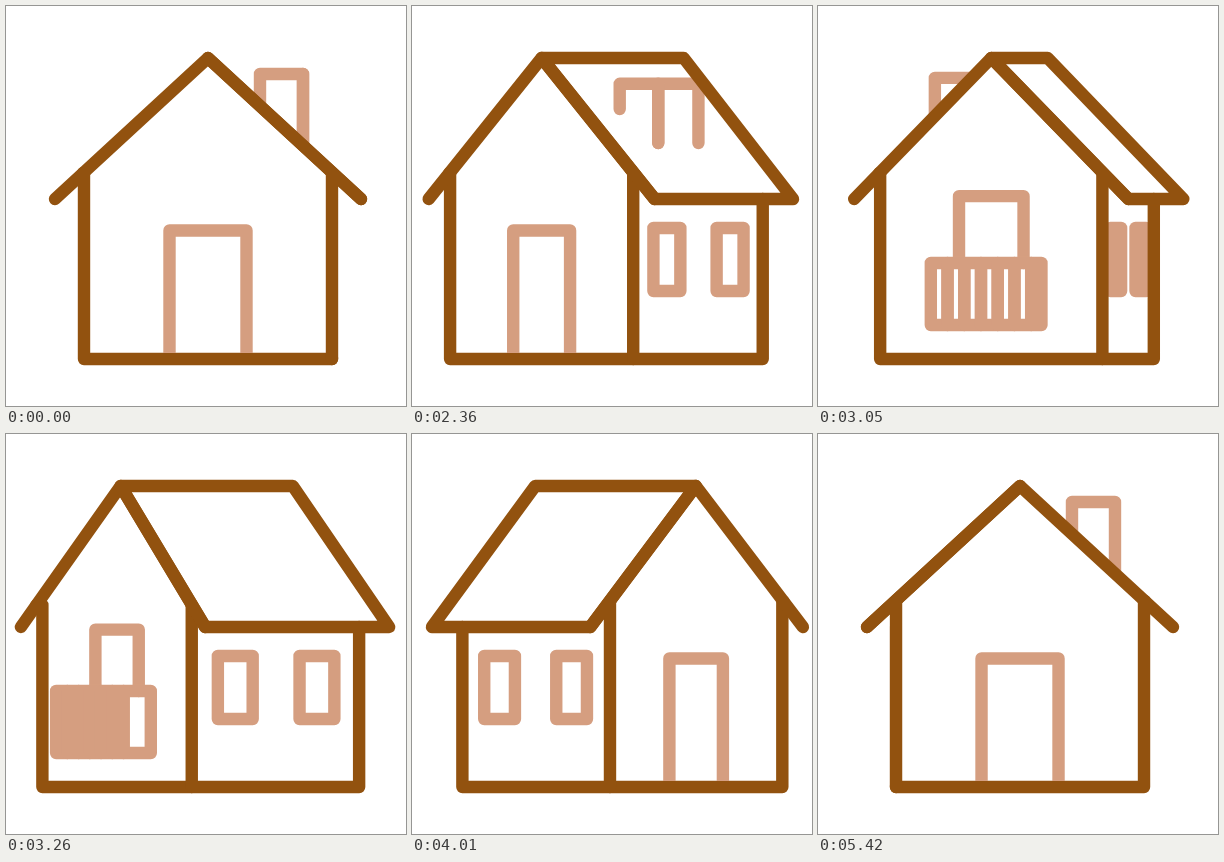
Recreate the animation shown at these times as an HTML page with a canvas. Size 400 by 400 pixels, loop 5.45 s.

```html
<!DOCTYPE html>
<html lang="en">
<head>
<meta charset="utf-8">
<title>Turning house</title>
<style>
html, body { margin: 0; width: 100%; height: 100%; overflow: hidden; background: #fff; }
canvas { display: block; width: 400px; height: 400px; }
</style>
</head>
<body>
<canvas id="stage" width="400" height="400"></canvas>
<script>
const ctx = document.getElementById('stage').getContext('2d');
const BROWN = '#92520f', TAN = '#d59e80';
const LOOP = 5450, HOLD = 2030, STEP = 30, START = 1990;
const CENTER = 202, PEAK = 52, EAVE = 193, BASE = 353;

function bezier(a, b, c, d, s) {
  const u = 1 - s;
  return a * u * u * u + 3 * b * u * u * s + 3 * c * u * s * s + d * s * s * s;
}

function ease(x) {
  let lo = 0, hi = 1;
  for (let i = 0; i < 30; i++) {
    const mid = (lo + hi) / 2;
    if (bezier(0, .19, .23, 1, mid) < x) lo = mid; else hi = mid;
  }
  return bezier(0, 0, 1, 1, lo);
}

function trace(points) {
  ctx.beginPath();
  points.forEach(([x, y]) => ctx.lineTo(x, y));
}

function line(color, points, closed) {
  trace(points);
  if (closed) ctx.closePath();
  ctx.strokeStyle = color;
  ctx.stroke();
}

function blank(points) {
  trace(points);
  ctx.fillStyle = '#fff';
  ctx.fill();
}

function box(x1, y1, x2, y2) {
  line(TAN, [[x1, y1], [x2, y1], [x2, y2], [x1, y2]], true);
}

// An upside-down U: two legs joined at the top.
function arch(x1, y1, top, x2, y2) {
  line(TAN, [[x1, y1], [x1, top], [x2, top], [x2, y2]]);
}

// turn: 0 = end face seen straight on, 1 = corner view, 2 = long side straight on.
// Views with the end face on the right are drawn mirrored.
function drawHouse(turn, isBack, chimneyNear, mirrored) {
  const mix = (a, b, f) => a + (b - a) * f;
  const pose = (corner, side, front = 0) =>
    turn < 1 ? mix(front, corner, turn) : mix(corner, side, turn - 1);
  const squash = pose(Math.SQRT1_2, 0, 1);

  // Both ends of a width on the end face, then the far end of its long side.
  function span(half, corner, side) {
    const mid = CENTER - pose(81, side / 2);
    const near = mid + half * squash;
    return [mid - half * squash, near, near + pose(corner, side)];
  }

  const [wallA, wallB, wallC] = span(124, 145, 296);
  const [roofA, roofB, roofC] = span(153, 155, 350);
  const [ridgeA, , ridgeB] = span(0, 159, 248);
  const wallTop = pose(167, EAVE, 167);
  const roofPlane = [[ridgeA, PEAK], [ridgeB, PEAK], [roofC, EAVE], [roofB, EAVE]];
  const gable = [[roofA, EAVE], [ridgeA, PEAK], [roofB, EAVE]];

  ctx.setTransform(1, 0, 0, 1, 0, 0);
  ctx.fillStyle = '#fff';
  ctx.fillRect(0, 0, 400, 400);
  if (mirrored) ctx.setTransform(-1, 0, 0, 1, 2 * CENTER, 0);
  ctx.lineWidth = 12.4;
  ctx.lineJoin = ctx.lineCap = 'round';

  // chimney, in front of or behind the roof plane
  const top = pose(79, 84.5, 68), low = 137, high = 103;
  const thick = pose(38, 0, 43), reach = 95 * squash;
  if (chimneyNear) {
    const offset = pose(6, 12) * (mirrored ? -1 : 1);
    const outer = CENTER + reach - pose(23, 27) - offset;
    blank(roofPlane);
    arch(outer, low, top, outer + pose(45, 54), low);
    arch(outer, low, top, outer - thick, high);
  } else {
    arch(CENTER - reach, low, top, CENTER - reach + thick, high);
    blank(roofPlane);
  }
  blank([...gable, [wallB, BASE], [wallA, BASE]]);

  // side windows
  const length = wallC - wallB;
  if (length > 4)
    for (const p of [.26, .748])
      box(wallB + length * (p - .104), 222, wallB + length * (p + .104), 285);

  // end wall, tied to the roof edge
  const overhang = mix(ridgeA, roofA, (wallTop - PEAK) / (EAVE - PEAK));
  line(BROWN, [[overhang, wallTop], [wallA, wallTop], [wallA, BASE], [wallB, BASE]]);

  if (isBack) {
    const [d1, d2] = span(36, 0, 296);
    arch(d1, 257, pose(195, 199, 187.5), d2, 257);
    const [, hinge] = span(56, 0, 296);
    const right = hinge - pose(29, 17), left = right - 112 * squash;
    box(right, 257, hinge, 319);
    for (let i = 0; i < 6; i++)
      box(mix(left, right, i / 6), 257, mix(left, right, (i + 1) / 6), 319);
  } else {
    const [d1, d2] = span(38.5, 0, 296);
    ctx.lineCap = 'butt';
    arch(d1, 347, 224.5, d2, 347);
    ctx.lineCap = 'round';
  }

  // near corner, side wall and roof
  const meet = mix(PEAK, EAVE, (wallB - ridgeA) / (roofB - ridgeA));
  const cornerTop = Math.max(wallTop, Math.min(EAVE, meet));
  line(BROWN, [[wallB, cornerTop], [wallB, BASE], [wallC, BASE], [wallC, EAVE]]);
  line(BROWN, gable);
  line(BROWN, roofPlane, true);
}

function frame(now) {
  const t = now % LOOP;
  let pos = 0;
  if (t >= HOLD) {
    const shown = HOLD + Math.floor((t - HOLD) / STEP) * STEP;
    pos = 8 * ease((shown - START) / (LOOP - START));
  }
  const quarter = Math.min(3, Math.floor(pos / 2));
  const part = pos - 2 * quarter;
  const mirrored = quarter % 2 === 1;
  drawHouse(mirrored ? 2 - part : part, quarter === 1 || quarter === 2, quarter < 2, mirrored);
}

const begin = performance.now();
function tick() {
  frame(performance.now() - begin);
  requestAnimationFrame(tick);
}
tick();
</script>
</body>
</html>
```
